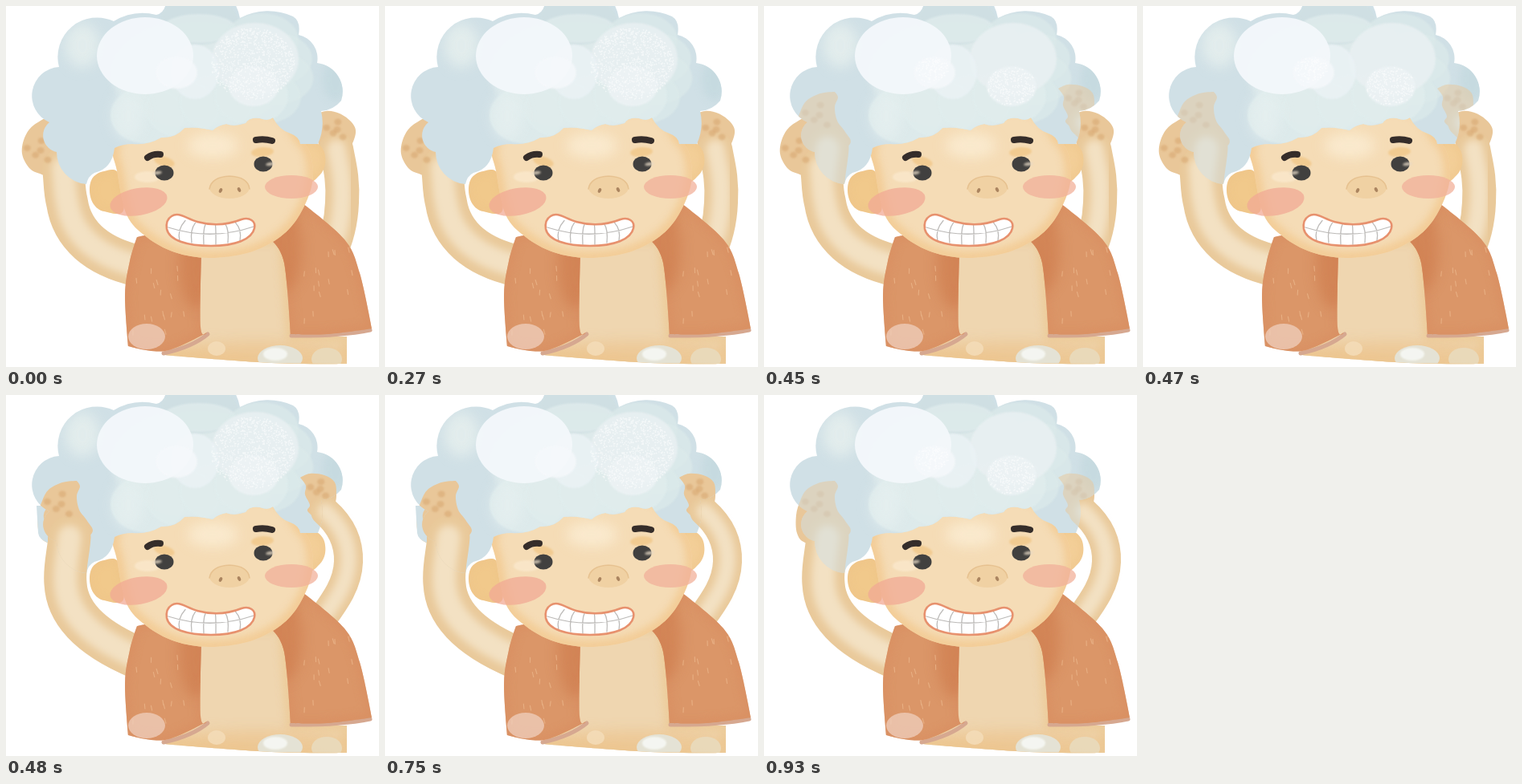
An HTML page for the animation above (0.96 s loop, 464 by 450 pixels).

```html
<!DOCTYPE html>
<html lang="en">
<head>
<meta charset="utf-8">
<title>Hair wash</title>
<style>
html, body { margin: 0; width: 100%; height: 100%; overflow: hidden; background: #fff; }
svg { display: block; width: 464px; height: 450px; }
</style>
</head>
<body>
<svg id="stage" viewBox="0 0 464 450" xmlns="http://www.w3.org/2000/svg"></svg>
<script>
const stage = document.getElementById('stage');
const HOLD = 450, BLEND = 30, HALF = HOLD + BLEND;
const SKIN = '#f3e1c3', EDGE = '#e9c99a', PALM = '#e9c799', HAIR = '#d0e0e6', FOAM = '#dfebec';

// Smooth closed curve through points; "!" marks a corner.
function curve(text) {
  const p = text.trim().split(/\s+/).map(s => {
    const [x, y] = s.replace('!', '').split(',').map(Number);
    return { x, y, k: s.endsWith('!') ? 0 : 1 / 6 };
  });
  const at = i => p[(i + p.length) % p.length];
  return p.reduce((d, b, i) => {
    const a = at(i - 1), c = at(i + 1), e = at(i + 2);
    return d + `C${b.x + (c.x - a.x) * b.k} ${b.y + (c.y - a.y) * b.k} ` +
      `${c.x - (e.x - b.x) * c.k} ${c.y - (e.y - b.y) * c.k} ${c.x} ${c.y}`;
  }, `M${p[0].x} ${p[0].y}`) + 'Z';
}

const blurred = size => size ? ` filter="url(#b${size})"` : '';

const oval = (x, y, rx, ry, fill, opacity = 1, blur = 0, turn = 0) =>
  `<ellipse cx="${x}" cy="${y}" rx="${rx}" ry="${ry}" fill="${fill}" opacity="${opacity}"` +
  `${blurred(blur)} transform="rotate(${turn} ${x} ${y})"/>`;

const line = (d, color, width, opacity = 1, blur = 0) =>
  `<path d="${d}" fill="none" stroke="${color}" stroke-width="${width}" opacity="${opacity}" ` +
  `stroke-linecap="round" stroke-linejoin="round"${blurred(blur)}/>`;

const repeat = (count, make) => Array.from({ length: count }, (_, i) => make(i)).join('');

let clips = 0;
function shaded(d, fill, edge, width, inside = '') {
  const id = 'c' + clips++;
  return `<clipPath id="${id}"><path d="${d}"/></clipPath><path d="${d}" fill="${fill}"/>` +
    `<g clip-path="url(#${id})">${line(d, edge, width, 0.75, 5)}${inside}</g>`;
}

let seed = 7;
const rand = () => (seed = seed * 16807 % 2147483647) / 2147483647;

function speckle(x, y, rx, ry) {
  const d = repeat(Math.round(rx * ry * 0.4), () => {
    const a = rand() * 2 * Math.PI, r = Math.sqrt(rand());
    return `M${(x + rx * r * Math.cos(a)).toFixed(1)} ${(y + ry * r * Math.sin(a)).toFixed(1)}h.1`;
  });
  return line(d, '#fff', 1.5, 0.6);
}

function hairs(x, y, w, h) {
  const d = repeat(16, () => `M${x + rand() * w} ${y + rand() * h}l${rand() * 3 - 1} 6`);
  return line(d, '#efbd92', 1.1, 0.65);
}

// A hand shape, a rounded limb lit along its middle, and dimples around the palm.
function arm(hand, bone, width, x, y, size) {
  const dimples = repeat(5, i => {
    const a = i * 2.4, r = size * Math.sqrt(i / 5);
    return oval(x + r * Math.cos(a), y + r * Math.sin(a), 4.5, 4, '#d5a36c', 0.5, 2);
  });
  return `<path d="${curve(hand)}" fill="${PALM}"/>` +
    line(bone, EDGE, width) + line(bone, SKIN, width * 0.55, 1, 5) + dimples;
}

const armsOut =
  arm('20,184 24,162 38,146 62,140 98,175 97,214 70,222 47,211 30,203',
    'M71 202C73 215 72 230 76 245C82 285 112 312 165 324', 52, 43, 180, 19) +
  arm('386,140 398,131 415,134 430,145 435,158 427,178 410,190 390,175',
    'M411 178C414 195 420 215 418 245C417 270 412 290 402 310', 42, 412, 154, 15);

const armsIn =
  arm('45,132 53,118 70,109 88,107! 92,114 88,126 91,143 101,157 107,172 80,190 51,184 41,172 40,150',
    'M79 177C78 195 72 215 74 235C76 275 110 305 165 328', 53, 69, 136, 20) +
  arm('366,103! 378,98 396,100 409,109 411,125 410,139 416,152 400,161 376,146 378,137 372,124 373,113',
    'M397 145C414 160 427 180 426 208C425 235 410 256 394 278', 36, 391, 117, 14);

const torso = shaded(
  curve('225,290! 345,290! 355,411! 424,412! 424,446! 330,445 195,435! 225,410!'),
  '#efd6b0', '#ecc994', 14, oval(310, 436, 125, 18, '#ecc188', 0.6, 8));

const cloth = (shape, foldX, foldY, hairX, hairY) => shaded(curve(shape), '#db9668', '#d98f62', 12,
  oval(foldX, foldY, 21, 52, '#cc7848', 0.55, 8) + hairs(hairX, hairY, 68, 100));
const vest =
  line('M196 433Q232 425 251 409M355 411Q412 412 453 404', '#d6a890', 5) +
  cloth('163,288! 154,318 148,360 152,424! 198,430 250,407! 242,400 243,308! 200,280!', 236, 325, 158, 312) +
  cloth('330,292! 346,320 354,409! 400,409 455,402! 440,333 421,291 370,247!', 347, 304, 366, 290);

const bubbles =
  oval(175, 412, 23, 16, '#f1d3c3', 0.7) + oval(262, 427, 11, 9, '#f4ddba', 0.8) +
  `<g clip-path="url(#floor)">${oval(341, 439, 28, 16, '#e4e4d8', 0.95)}${oval(335, 434, 15, 8, '#f6f8f4', 0.9, 2)}` +
  `${oval(399, 440, 19, 14, '#e9dbbd', 0.9)}</g>`;

const ears =
  shaded(curve('140,209 122,206 108,214 104,230 109,247 122,256 146,255'), '#f1c98b', '#eec388', 6) +
  shaded(curve('366,172 384,170 395,180 397,197 390,211 376,217'), '#f3cf98', '#eec388', 6);

const face = shaded(
  curve('134,176 138,205 150,260 175,288 210,307 252,314 300,308 338,290 363,264 380,225 380,190 366,165 320,125 160,140'),
  '#f5dcb6', '#f2c78c', 16,
  oval(257, 174, 32, 16, '#faebd0', 0.9, 8) + oval(176, 213, 16, 7, '#fae8cc', 0.8, 2));

const eye = (x, y, shine) =>
  oval(x, y, 11.5, 9.5, '#41403f') + oval(x + shine, y, 6, 2.2, '#e6d9c6', 0.75, 2, -8);

const features =
  oval(197, 194, 13, 6, '#f0c482', 0.7, 2, 15) + oval(319, 182, 14, 6, '#f0c482', 0.7, 2, -5) +
  line('M176 189Q183 184 192 185', '#352d2a', 8) + line('M311 167Q321 165 331 168', '#352d2a', 8) +
  eye(197, 208, -9) + eye(320, 197, 9) +
  oval(165, 244, 36, 17, '#f2aa94', 0.75, 0, -10) + oval(355, 225.5, 33, 14.5, '#f2b19a', 0.75) +
  oval(278, 226, 25, 14, '#efcf9f', 0.8) + line('M253 228Q256 213 278 212Q301 213 303 228', '#e3bb88', 1.6, 0.7) +
  oval(267, 230, 2, 3, '#ab8560', 1, 0, 25) + oval(290, 229, 2, 3, '#ab8560', 1, 0, -25);

const lips = 'M206 262C215 256 224 265 238 269C260 275 278 272 293 266C303 263 311 268 309 277' +
  'C306 291 285 299 255 299C225 299 203 292 200 278C199 271 201 265 206 262Z';
const teeth = repeat(6, i => {
  const x = 216 + i * 15, lean = 7 - i * 2.5;
  return `M${x + lean} ${264 + 9 * Math.sin((i + 1) / 2.5)}Q${x - lean / 2} 279 ${x} ${298 - Math.abs(i - 2.5) * 2}`;
});
const mouth = `<path d="${lips}" fill="#fff"/>` +
  line('M202 276Q255 293 308 275' + teeth, '#bdbbb9', 1.3) + line(lips, '#e7916e', 2.6);

const hairShape = 'M100 222A40 40 0 0 1 63 182A21 21 0 0 1 54 145A36 36 0 0 1 66 76A49 49 0 0 1 134 19' +
  'A70 70 0 0 1 187 11Q197 9 199 -4H284Q289 4 291 15A74 74 0 0 1 357 13Q367 19 364 36A30 30 0 0 1 387 71' +
  'A36 36 0 0 1 417 118Q407 130 392 131Q397 152 388 172L366 172Q365 163 354 159Q340 155 332 139' +
  'Q326 144 316 140Q303 138 298 146Q284 151 274 147Q263 149 257 155Q238 150 222 152Q211 165 193 164' +
  'Q176 174 157 172Q145 172 135 177Q132 203 110 208Q102 212 100 222Z';

const puff = (x, y, rx, ry, fill = FOAM, opacity = 0.85) => oval(x, y, rx, ry, fill, opacity, 2);
const foam =
  oval(95, 49, 22, 28, '#e4eeed', 0.9, 8) + oval(410, 92, 16, 26, '#c4d9df', 0.8, 5) +
  oval(240, 85, 108, 66, FOAM, 0.9, 5) + puff(240, 18, 48, 30, '#cfdfe2') + puff(240, 28, 46, 18) +
  repeat(4, i => puff(318 + 20 * Math.sin(i), 42 + i * 24, 46, 33, '#dceaea', 0.7)) +
  repeat(4, i => puff(176 + i * 43, 136 - i * 8, 46, 36, '#e0eded', 0.8)) +
  oval(152, 137, 20, 30, '#e6f0f0', 0.7, 8) + puff(310, 66, 54, 45, '#e9f0f2') + puff(235, 82, 30, 34, '#eaf2f5') +
  oval(173, 62, 60, 48, '#f4f8fb', 0.95) + puff(212, 83, 26, 20, '#f5f8fb') + puff(308, 100, 31, 25, '#edf3f5');

stage.innerHTML = `<defs>
  ${[[2, 1.2], [5, 5], [8, 8]].map(([id, size]) => `<filter id="b${id}" x="-60%" y="-60%" width="220%" height="220%">
    <feGaussianBlur stdDeviation="${size}"/></filter>`).join('')}
  <clipPath id="hair"><path d="${hairShape}"/></clipPath>
  <clipPath id="floor"><path d="M195 400H424V446L330 445L195 435Z"/></clipPath>
</defs>
<rect width="464" height="450" fill="#fff"/>
<g id="out">${armsOut}</g><g id="in">${armsIn}</g>
${torso}${vest}${bubbles}${ears}${face}${features}${mouth}
<path id="lock" d="M38 138H54Q45 145 47 155Q53 168 52 184Q41 180 40 172Z" fill="${HAIR}"/>
<path d="${hairShape}" fill="${HAIR}"/>
<g clip-path="url(#hair)">${foam}
  <g id="wide">${speckle(307, 72, 52, 45)}</g>
  <g id="small">${speckle(308, 100, 30, 24)}${speckle(209, 80, 21, 16)}</g>
  <g id="hands">${armsIn}</g>
</g>`;

const [out, inner, lock, wide, small, hands] =
  ['out', 'in', 'lock', 'wide', 'small', 'hands'].map(id => document.getElementById(id));
const show = (el, on) => el.setAttribute('visibility', on ? 'visible' : 'hidden');

function draw(time) {
  const t = time % (2 * HALF);
  const raised = t >= HALF, blending = t % HALF >= HOLD;
  show(out, !raised);
  show(inner, raised);
  show(lock, raised && !blending);
  show(wide, !blending);
  show(small, blending);
  hands.setAttribute('opacity', blending ? 0.5 : raised ? 1 : 0);
}

function tick() {
  draw(performance.now());
  requestAnimationFrame(tick);
}
tick();
</script>
</body>
</html>
```
